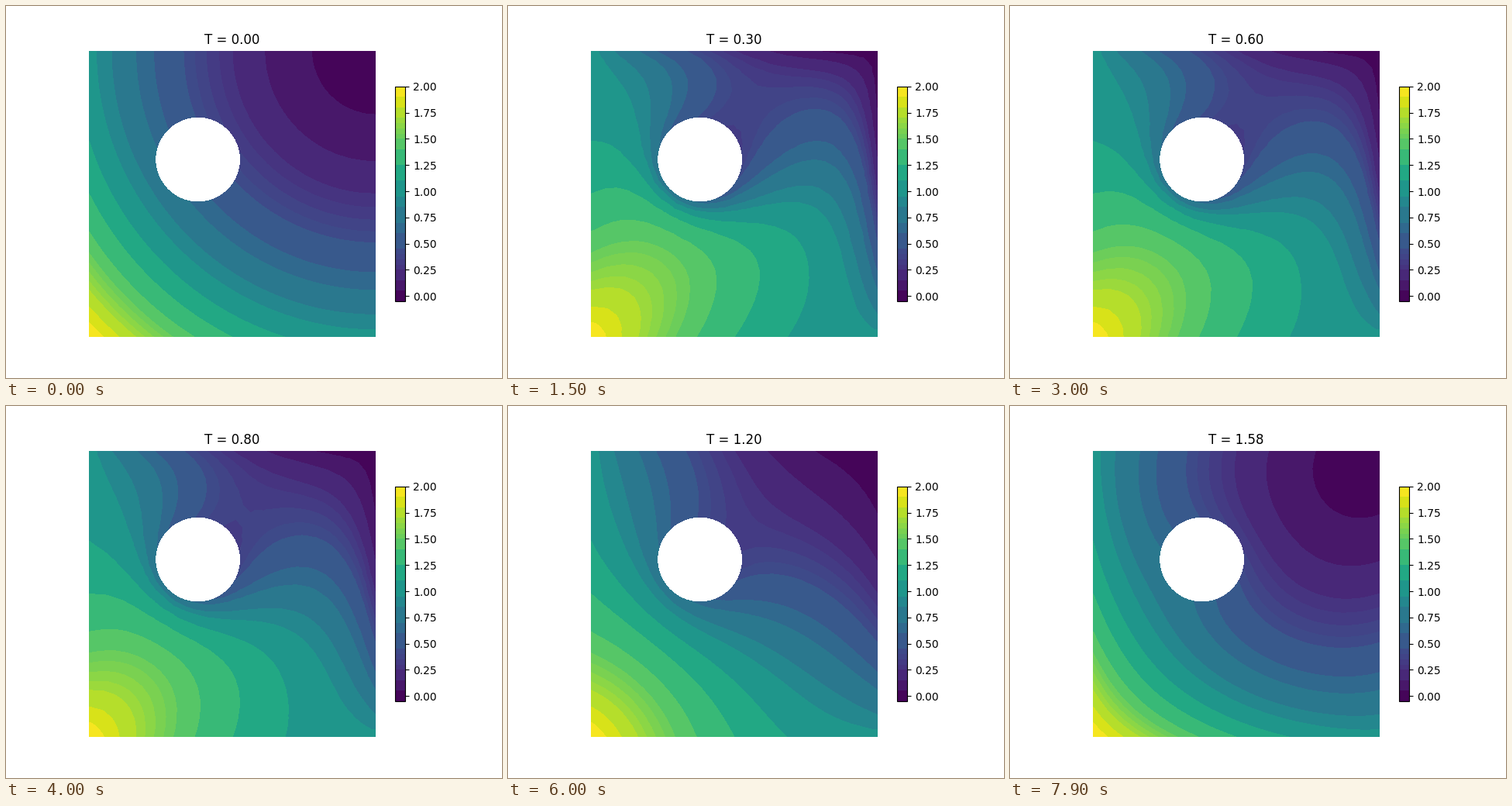
A matplotlib script for the animation above (8000 ms loop, 640 by 480 pixels).

```python
import numpy as np
import matplotlib.pyplot as plt
from matplotlib.animation import FuncAnimation
from matplotlib.cm import ScalarMappable
from matplotlib.colors import BoundaryNorm, ListedColormap
from matplotlib.tri import Triangulation

FRAMES, DT = 80, 0.02
CENTER, RADIUS = np.array([0.38, 0.62]), 0.1485
SPEED, OMEGA, SOURCE = 10.0, 1.08, -4.0
LEVELS = np.array([-0.05, 0.05, 0.15, 0.25, 0.3, 0.35, 0.4, 0.45, 0.6, 0.7,
                   0.85, 0.95, 1.1, 1.25, 1.4, 1.5, 1.55, 1.6, 1.65, 1.7,
                   1.8, 1.9, 2.0])
COLORS = plt.get_cmap("viridis")(((LEVELS[1:] + LEVELS[:-1]) / 2 + 0.025) / 2)


def build_mesh(n=26, ring=64):
    """Unit square with a round hole: jittered hexagonal points."""
    rng = np.random.default_rng(4)
    h = 1 / n
    rows = int(round(n * 2 / np.sqrt(3)))
    inner = [((i + 0.5 * (j % 2)) * h, j / rows)
             for j in range(1, rows) for i in range(n + 1)]
    inner = np.array(inner) + rng.uniform(-0.15 * h, 0.15 * h, (len(inner), 2))
    inside = np.all((inner > 0.5 * h) & (inner < 1 - 0.5 * h), axis=1)
    clear = np.hypot(*(inner - CENTER).T) > RADIUS + 0.6 * h
    inner = inner[inside & clear]

    s = np.arange(n) / n
    zero, one = np.zeros(n), np.ones(n)
    edge = np.column_stack([np.r_[s, one, 1 - s, zero],
                            np.r_[zero, s, one, 1 - s]])
    a = 2 * np.pi * np.arange(ring) / ring
    hole = CENTER + RADIUS * np.column_stack([np.cos(a), np.sin(a)])

    pts = np.vstack([hole, edge, inner])
    tri = Triangulation(*pts.T)
    tri.set_mask(np.all(tri.triangles < ring, axis=1))
    return tri, ring + len(edge)


def assemble(tri):
    """Linear-element mass, stiffness and diagonal-drift matrices."""
    cells = tri.get_masked_triangles()
    x, y = tri.x[cells], tri.y[cells]
    b = np.roll(y, -1, 1) - np.roll(y, -2, 1)
    c = np.roll(x, -2, 1) - np.roll(x, -1, 1)
    area = 0.5 * np.abs(b[:, 0] * c[:, 1] - b[:, 1] * c[:, 0])[:, None, None]
    stiff = (b[:, :, None] * b[:, None, :] + c[:, :, None] * c[:, None, :]) / (4 * area)
    mass = area / 12 * (np.ones((3, 3)) + np.eye(3))
    drift = np.repeat((b + c)[:, None, :] / 6, 3, axis=1)
    rows = np.repeat(cells[:, :, None], 3, axis=2)
    cols = np.repeat(cells[:, None, :], 3, axis=1)

    def gather(local):
        full = np.zeros((len(tri.x),) * 2)
        np.add.at(full, (rows, cols), local)
        return full

    return gather(mass), gather(stiff), gather(drift)


def solve(tri, fixed):
    """Implicit Euler steps; the drift swings back and forth in time."""
    mass, stiff, drift = assemble(tri)
    load = SOURCE * mass.sum(axis=1)
    u = (1 - tri.x) ** 2 + (1 - tri.y) ** 2
    states = [u]
    for k in range(1, FRAMES):
        speed = SPEED * np.cos(OMEGA * k * DT)
        lhs = mass / DT + stiff + speed * drift
        rhs = mass @ u / DT + load
        nxt = u.copy()
        nxt[fixed:] = np.linalg.solve(lhs[fixed:, fixed:],
                                      rhs[fixed:] - lhs[fixed:, :fixed] @ u[:fixed])
        u = nxt
        states.append(u)
    return states


mesh, n_fixed = build_mesh()
fields = solve(mesh, n_fixed)

fig, ax = plt.subplots(figsize=(6.4, 4.8), dpi=100)
ax.set(xlim=(0, 1), ylim=(0, 1), aspect="equal")
ax.set_axis_off()
title = ax.set_title("T = 0.00")
scale = ScalarMappable(BoundaryNorm(LEVELS, len(COLORS)), ListedColormap(COLORS))
bar = fig.colorbar(scale, ax=ax, shrink=0.75, spacing="proportional",
                   ticks=np.arange(0, 2.01, 0.25), format="%.2f")
bar.minorticks_off()
shown = []


def draw(k):
    while shown:
        shown.pop().remove()
    shown.append(ax.tricontourf(mesh, fields[k], levels=LEVELS, colors=COLORS))
    title.set_text(f"T = {k * DT:.2f}")
    return shown + [title]


anim = FuncAnimation(fig, draw, frames=FRAMES, interval=100,
                     repeat=True, repeat_delay=0, blit=False)
plt.show()
```
